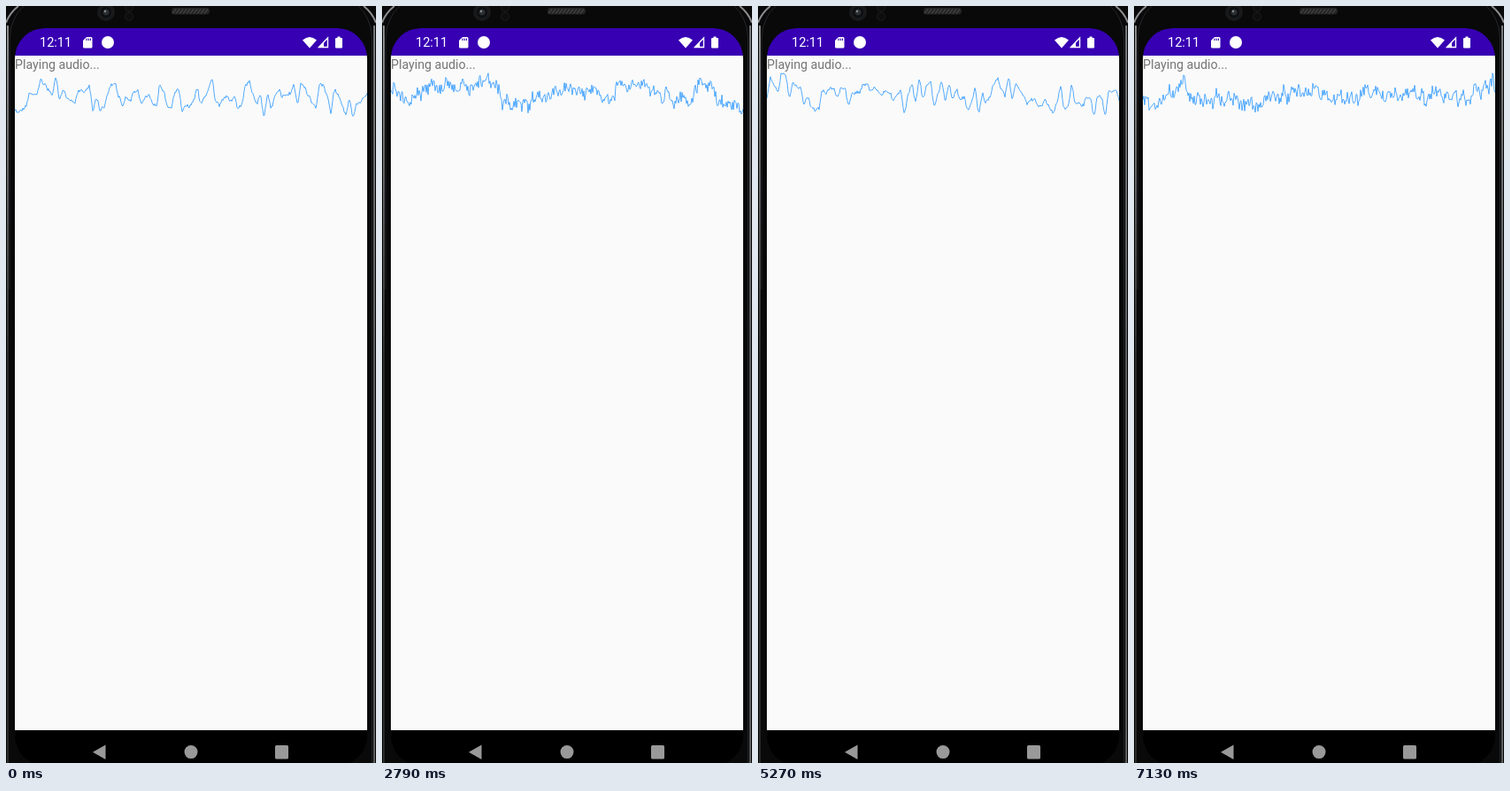
An HTML page with a canvas that plays this animation: 418 px wide and 854 px high, repeating every 7160 ms.

```html
<!DOCTYPE html>
<html lang="en">
<head>
<meta charset="utf-8">
<title>Playing audio</title>
<style>
html, body { margin: 0; width: 100%; height: 100%; overflow: hidden; background: #09090a; }
canvas { display: block; }
</style>
</head>
<body>
<canvas id="stage" width="418" height="854"></canvas>
<script>
const ctx = document.getElementById('stage').getContext('2d');
const LOOP = 7160, TICK = 30;
const LEFT = 10, WIDTH = 398, TOP = 75, HEIGHT = 50;

// Audio buffers arrive in bursts: first time, last time, count.
const bursts = [
  [0, 0, 1], [60, 690, 7], [810, 1410, 7], [1530, 1920, 5],
  [2070, 2670, 7], [2790, 3390, 7], [3510, 4110, 7], [4230, 4860, 7],
  [4950, 5450, 6], [5600, 5750, 3], [5900, 6590, 8], [6710, 7130, 5]
];
const snap = time => Math.floor(time / TICK) * TICK;
const changes = bursts.flatMap(([first, last, count]) =>
  Array.from({ length: count }, (_, i) =>
    first + snap((last - first) * i / Math.max(1, count - 1))));

function random(seed, i) {
  let n = Math.imul(i + 1, 374761393) ^ Math.imul(seed + 11, 668265263);
  n = Math.imul(n ^ (n >>> 13), 1274126177);
  n = Math.imul(n ^ (n >>> 15), 2246822519);
  return ((n ^ (n >>> 16)) >>> 0) / 4294967296;
}

function noise(seed, x) {
  const i = Math.floor(x), u = x - i;
  const a = random(seed, i), b = random(seed, i + 1);
  return (a + (b - a) * u * u * (3 - 2 * u)) * 2 - 1;
}

// The sound drifts between smooth swings and a grainy line.
function makeWave(step) {
  const smooth = Math.cos(Math.PI * changes[step] / 5270) ** 8;
  const seed = step * 3;
  const samples = Array.from({ length: WIDTH + 1 }, (_, x) =>
    0.75 * noise(seed, x / 22)
    + (0.45 + 0.5 * smooth) * noise(seed + 1, x / 4.2)
    + (0.4 - 0.28 * smooth) * noise(seed + 2, x));
  const peak = Math.max(...samples.map(Math.abs));
  return samples.map(v => v / peak);
}

function drawWave(step) {
  ctx.beginPath();
  makeWave(step).forEach((v, x) =>
    ctx.lineTo(LEFT + x, TOP + HEIGHT / 2 + v * (HEIGHT / 2 - 0.7)));
  ctx.strokeStyle = '#1e90ff';
  ctx.lineWidth = 0.75;
  ctx.lineJoin = 'round';
  ctx.stroke();
}

function shape(path, color) {
  ctx.fillStyle = color;
  ctx.fill(new Path2D(path));
}

function outline(path, color, width) {
  ctx.strokeStyle = color;
  ctx.lineWidth = width;
  ctx.stroke(new Path2D(path));
}

function box(x, y, w, h, color, radius = 0) {
  ctx.fillStyle = color;
  ctx.beginPath();
  ctx.roundRect(x, y, w, h, radius);
  ctx.fill();
}

function disc(x, y, r, color) {
  box(x - r, y - r, 2 * r, 2 * r, color, r);
}

function text(value, x, y, size, color) {
  ctx.font = `${size}px Roboto, sans-serif`;
  ctx.fillStyle = color;
  ctx.fillText(value, x, y);
}

function fade(from, to) {
  const gradient = ctx.createLinearGradient(0, 0, 0, 400);
  gradient.addColorStop(0.1, from);
  gradient.addColorStop(1, to);
  return gradient;
}

function drawCase() {
  box(0, 0, 418, 854, '#09090a');
  outline('M14 0Q4 8 0 19M404 0Q414 8 418 19', '#8a8c8e', 2);
  outline('M20 0Q6 12 4 36V320M398 0Q412 12 413.5 36V854', '#242527', 1);
  box(1, 22, 2, 832, fade('#8a8c8e', '#2a2b2d'));
  box(415, 22, 2, 832, fade('#77797b', '#5c5e60'));

  disc(113, 7, 10, '#18191a');
  disc(113, 7, 6, '#0c0d0f');
  disc(113, 7, 3.5, '#2c2f32');
  disc(112, 6, 1.2, '#8b8e91');
  for (const y of [2, 12]) {
    disc(139, y, 5, '#1a1a1b');
    disc(139, y, 3.8, '#0d0d0e');
  }

  box(187, 2, 43, 7.5, '#242425', 3.5);
  for (let x = 188; x < 226; x += 4) outline(`M${x} 8.5l4 -5`, '#4a4a4b', 1.2);
}

function drawStatusBar() {
  const white = '#fff', purple = '#3700b3';
  box(10, 25, 398, 31, purple, [34, 34, 0, 0]);
  text('12:11', 38, 46, 14.5, white);

  shape('M91 35H96Q97.5 35 97.5 36.5V46Q97.5 47.5 96 47.5H88.5Q87 47.5 87 46V39Z', white);
  for (let x = 90.5; x < 96; x += 2.2) box(x, 36.5, 1.1, 2.6, purple);
  disc(115, 41, 7, white);

  shape('M335 38.5Q343 31.5 351 38.5L343 47.5Z', white);
  outline('M353.5 46.5L363.5 36V46.5Z', white, 1.4);
  shape('M353 47L359 41V47Z', white);
  box(374.5, 34.5, 3, 2, white);
  box(372, 36, 8, 11.5, white, 1);
}

function drawNavigation() {
  const gray = '#999';
  box(10, 817, 398, 60, '#000', [0, 0, 34, 34]);
  shape('M98 841.7L112.5 833.5V850Z', gray);
  disc(209, 841.6, 7.5, gray);
  box(304, 834, 15, 15.4, gray, 1.5);
}

function drawScreen(step) {
  ctx.save();
  ctx.beginPath();
  ctx.roundRect(10, 25, 398, 832, 34);
  ctx.clip();
  box(10, 55.5, 398, 762, '#fafafa');
  drawStatusBar();
  drawNavigation();
  text('Playing audio...', 10, 71, 14.2, '#757575');
  drawWave(step);
  ctx.restore();
}

const start = performance.now();
let shown = -1;

function play() {
  const t = (performance.now() - start) % LOOP;
  const step = changes.findLastIndex(time => time <= t);
  if (step !== shown) {
    drawCase();
    drawScreen(step);
    shown = step;
  }
  requestAnimationFrame(play);
}

play();
</script>
</body>
</html>
```
